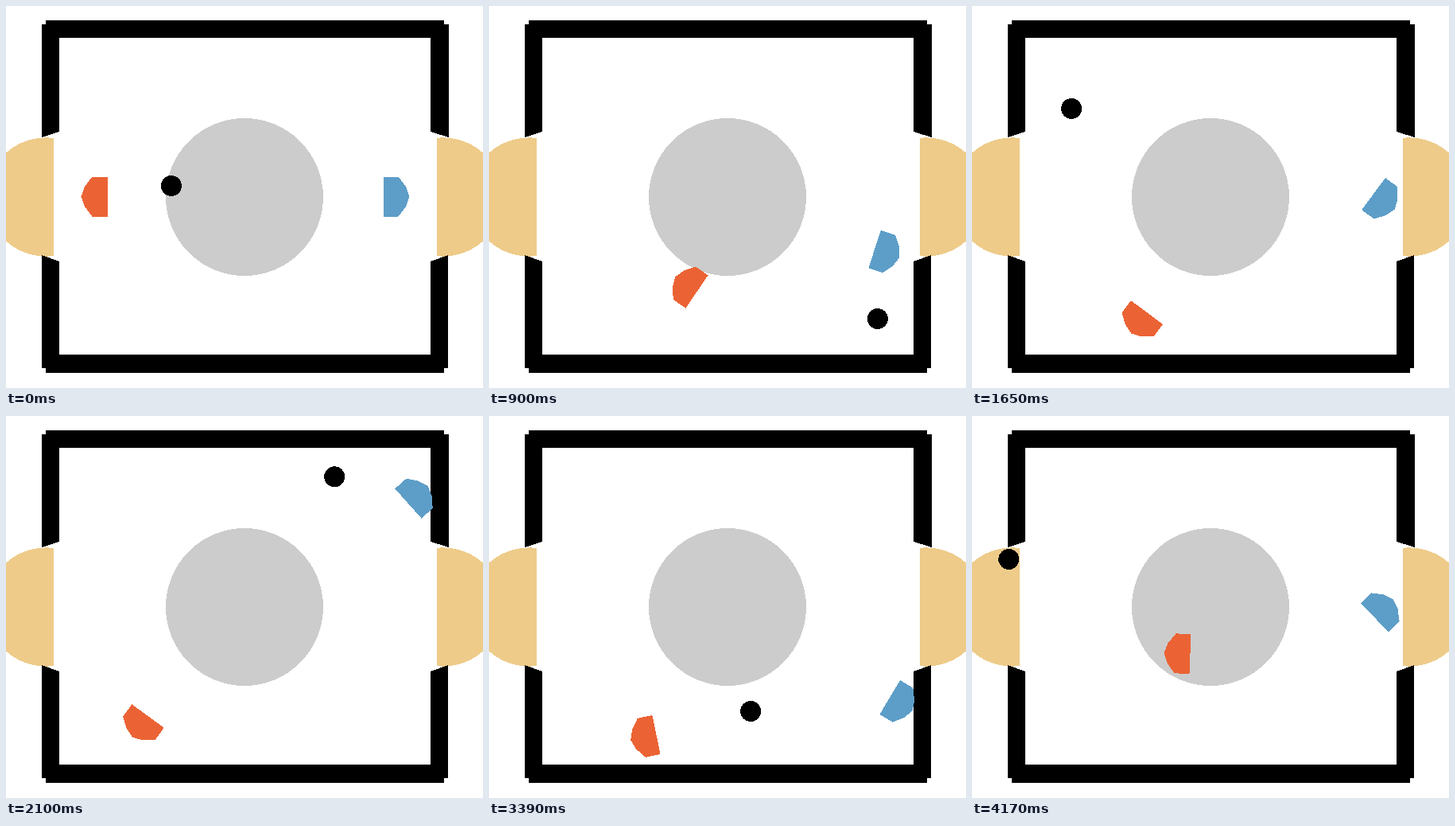
An HTML page for the animation above (4200 ms loop, 600 by 480 pixels).

```html
<!DOCTYPE html>
<html lang="en">
<head>
<meta charset="utf-8">
<title>Table game</title>
<style>
  html, body { margin: 0; width: 100%; height: 100%; overflow: hidden; background: #fff; }
  svg { display: block; width: 600px; height: 480px; shape-rendering: crispEdges; }
</style>
</head>
<body>
<svg viewBox="0 0 600 480">
  <defs>
    <clipPath id="leftSide"><rect width="60" height="480"/></clipPath>
    <clipPath id="rightSide"><rect x="542" width="58" height="480"/></clipPath>
    <!-- drawn around the centre of mass, flat side to the left -->
    <path id="paddle" d="M-14.7-25H4.3L13.8-12.5L18.3 0L13.8 12.5L4.3 25H-14.7Z"/>
  </defs>
  <circle cx="300" cy="240" r="99" fill="#ccc"/>
  <g fill="#eecb89">
    <circle cx="50" cy="240" r="74.6" clip-path="url(#leftSide)"/>
    <circle cx="550" cy="240" r="74.6" clip-path="url(#rightSide)"/>
  </g>
  <path d="M50 18H551V40H50Z M50 438H551V461H50Z
    M45 23H67V158L45 165Z M534 23H557V165L534 158Z
    M45 313L67 321V455H45Z M534 321L556 313V455H534Z"/>
  <g transform="translate(.5 .5)">
    <g id="red" fill="#eb6334"><use href="#paddle" transform="scale(-1 1)"/></g>
    <g id="blue" fill="#5d9ec8"><use href="#paddle"/></g>
  </g>
  <circle id="ball" r="13"/>
</svg>
<script>
  const STEP = 30, STEPS = 140;
  const RIGHT = 521, TOP = 53, BOTTOM = 425;   // limits for the ball's centre

  // Step of each hit and the ball's velocity after it
  const hits = [
    [0, -10, -2.2], [6, 14.2, 7.51], [35, -21.97, -15.4], [53, 19.2, -6.62],
    [73, -13.84, 13.23], [98, 13.63, -3.47], [123, -26.2, -9.77]
  ];

  // Steps at which the players change course, and their poses there
  const turns = [0, 18, 30, 55, 70, 94, 113, 139];
  const redX = [112.3, 236, 248.9, 210.7, 169.4, 84.7, 195.6, 259.3];
  const redY = [239, 288, 350.2, 396.3, 388.4, 414.9, 403, 298];
  const redTurn = [0, 14, 34.3, -53.4, -54, -40, -11.8, 2.3];
  const blueY = [239, 253, 309.6, 244.3, 99.7, 221.1, 360.5, 242.6];
  const blueTurn = [0, 3, 18, 36.6, -41.7, 20.3, 30.8, -45];

  const el = id => document.getElementById(id);
  const [ball, red, blue] = ['ball', 'red', 'blue'].map(el);

  // Straight flight from hit to hit, mirrored at the walls
  function ballAt(s) {
    let x = 208, y = 226;
    hits.forEach(([from, vx, vy], i) => {
      if (s < from) return;
      const end = i + 1 < hits.length ? hits[i + 1][0] : STEPS;
      const time = Math.min(s, end) - from;
      x += vx * time;
      y += vy * time;
      if (x > RIGHT) x = 2 * RIGHT - x;
      if (y > BOTTOM) y = 2 * BOTTOM - y;
      if (y < TOP) y = 2 * TOP - y;
    });
    return [x, y];
  }

  // Slope at a turn, zero at extremes so that the curve never overshoots
  function slope(values, i) {
    if (i === 0 || i === turns.length - 1) return 0;
    const rate = j => (values[j + 1] - values[j]) / (turns[j + 1] - turns[j]);
    const p = rate(i - 1), q = rate(i);
    return p * q > 0 ? 2 * p * q / (p + q) : 0;
  }

  function smooth(values, s) {
    let i = 0;
    while (i < turns.length - 2 && turns[i + 1] <= s) i++;
    const h = turns[i + 1] - turns[i], u = (s - turns[i]) / h, v = 1 - u;
    return values[i] * v * v * (1 + 2 * u) + values[i + 1] * u * u * (3 - 2 * u) +
      h * u * v * (slope(values, i) * v - slope(values, i + 1) * u);
  }

  // Blue drifts back to its goal and stays in front of it
  const blueX = s => 488.7 + 27.7 * Math.min(1, s / 55) ** 1.7;

  function place(node, x, y, turn = 0) {
    node.setAttribute('transform', `translate(${x} ${y}) rotate(${turn})`);
  }

  function draw(s) {
    place(ball, ...ballAt(s));
    place(red, smooth(redX, s), smooth(redY, s), smooth(redTurn, s));
    place(blue, blueX(s), smooth(blueY, s), smooth(blueTurn, s));
  }

  const start = performance.now();
  function tick() {
    const ms = performance.now() - start;
    draw(Math.floor(ms / STEP) % STEPS);
    requestAnimationFrame(tick);
  }
  draw(0);
  requestAnimationFrame(tick);
</script>
</body>
</html>
```
